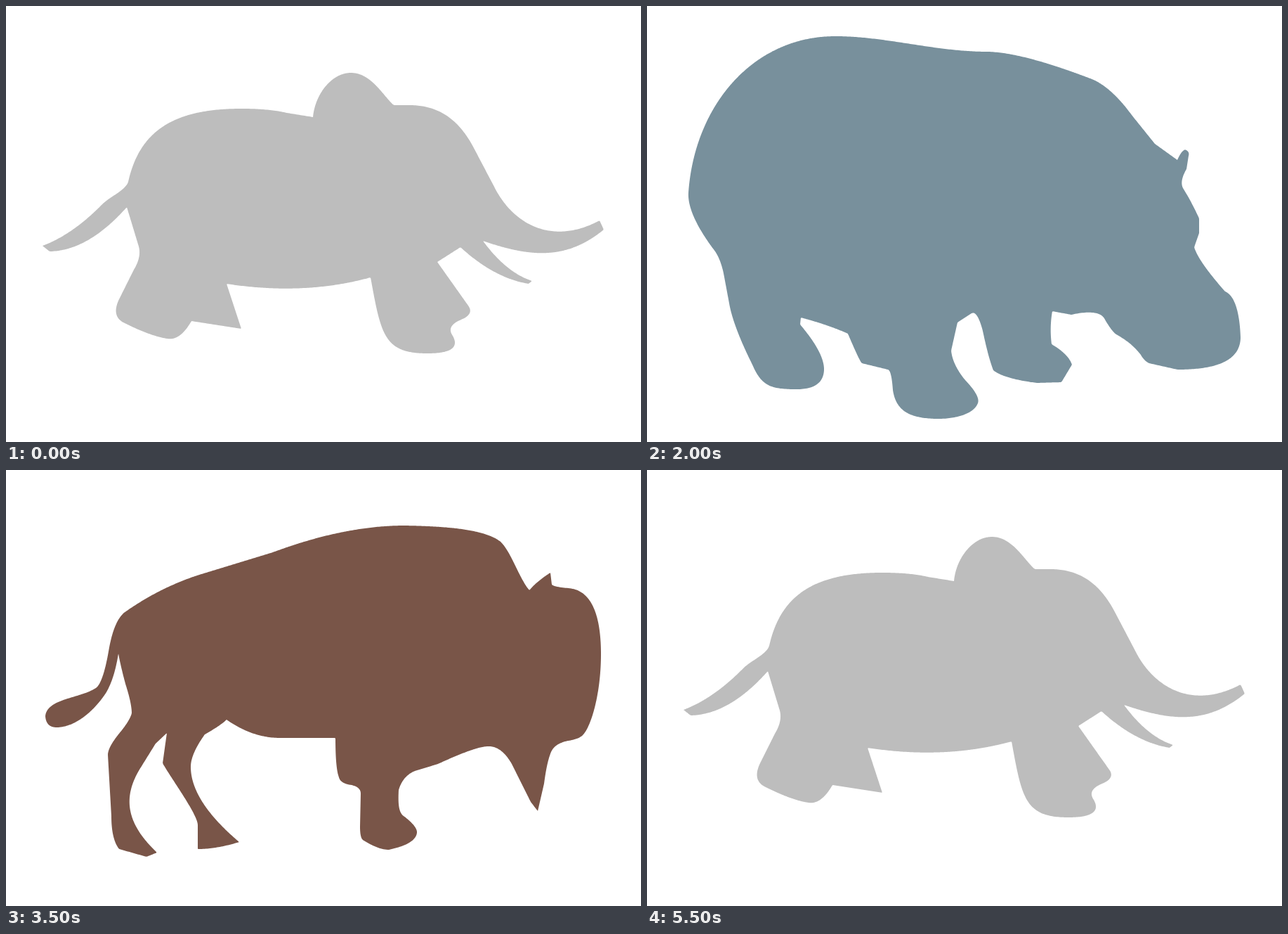
Recreate the animation shown at these times as an HTML page with a canvas. Size 904 by 620 pixels, loop 6 s.

```html
<!DOCTYPE html>
<html lang="en">
<head>
<meta charset="utf-8">
<title>Animal morph</title>
<style>
  html, body { margin: 0; width: 100%; height: 100%; overflow: hidden; background: #fff; }
  canvas { display: block; }
</style>
</head>
<body>
<canvas width="904" height="620"></canvas>
<script>
const mix = (a, b, t) => a.map((v, i) => v + (b[i] - v) * t);

// Samples a path about every 2 px, start point included at both ends.
function outline(d) {
  const path = document.createElementNS('http://www.w3.org/2000/svg', 'path');
  path.setAttribute('d', d);
  const length = path.getTotalLength(), n = Math.round(length / 2);
  return Array.from({ length: n + 1 }, (_, i) => {
    const { x, y } = path.getPointAtLength(length * i / n);
    return [x, y];
  });
}

// All outlines run clockwise from the tail tip.
const elephant = {
  color: [189, 189, 189],
  points: outline(`M52 341 Q95 325 138 281 C150 270 170 262 174 250 C190 178 238 146 335 146
    Q375 146 400 152 L437 158 C440 125 464 95 491 95 C520 95 537 128 552 141 L577 141
    C620 142 646 165 665 200 L695 257 C722 311 778 341 845 305 L851 318 C797 362 746 357 679 334
    Q712 379 749 391 L744 395 Q695 387 647 343 L614 364 L658 426 Q667 438 648 446
    Q626 455 636 469 Q650 494 600 494 C538 494 534 468 519 386 Q424 412 314 395 L335 459 L264 448
    Q248 476 230 473 Q207 470 167 450 Q149 440 162 415 L182 375 Q193 357 189 342 L172 286
    Q117 348 62 349 Z`)
};
const hippo = {
  color: [120, 144, 156],
  points: outline(`M59 265 C68 140 152 43 268 43 C340 43 410 65 485 65 Q535 66 636 105
    Q663 118 690 155 L723 196 L755 219 Q760 207 766 204 Q773 207 771 213 L768 232 Q758 249 763 259
    Q775 278 786 302 V323 L779 343 Q785 363 823 406 C838 412 844 440 845 472
    C844 505 810 517 755 517 L715 508 Q708 505 703 496 Q690 479 668 467 Q662 463 652 446
    Q645 430 604 439 L577 434 Q573 457 576 481 Q600 495 605 510 L590 535 L555 536 Q508 530 493 518
    Q486 500 478 462 Q470 432 462 437 L442 450 L433 490 Q435 510 453 532 Q475 555 471 565
    C465 580 440 587 415 587 C370 587 354 573 350 546 Q348 518 343 517 L306 508 Q303 506 286 466
    Q260 454 219 443 L218 453 Q253 494 252 518 C251 538 235 545 213 545 C175 545 163 540 150 510
    Q125 460 118 428 L109 380 Q104 357 94 345 Q57 295 59 265 Z`)
};
const bison = {
  color: [121, 85, 72],
  points: outline(`M56 350 C58 325 105 325 128 310 Q138 303 146 258 Q153 216 168 203
    Q223 164 285 146 L380 117 Q482 79 568 79 C620 80 680 83 704 102 C719 116 730 153 745 171
    Q756 158 775 146 L777 163 Q779 166 800 168 C833 170 847 205 847 262 C847 320 832 368 820 378
    Q814 383 800 385 Q781 389 776 401 Q770 415 766 446 L757 485 L747 472 L720 418 Q705 392 686 393
    Q669 393 615 418 L582 428 Q565 435 559 455 C558 475 559 487 566 492 Q586 507 585 516
    Q583 532 545 540 Q530 540 508 526 Q504 523 504 507 L505 460 Q505 451 492 448 Q476 446 474 437
    Q469 425 469 381 H390 Q351 381 314 355 Q306 363 283 376 Q263 404 263 422 C263 463 300 502 332 529
    Q300 539 273 539 V505 C273 490 236 440 223 417 L229 374 L213 389 L190 426
    C168 463 168 500 215 544 L200 550 L161 539 Q150 525 150 492 L145 405 Q145 395 160 376
    Q176 357 179 346 Q179 332 170 304 Q163 278 160 261 Q154 299 141 319 C118 352 92 366 72 366
    Q57 366 56 350 Z`)
};

function nearest(points, [x, y]) {
  const far = points.map(p => Math.hypot(p[0] - x, p[1] - y));
  return far.indexOf(Math.min(...far));
}

function along(points, i) {
  const k = Math.floor(i);
  return mix(points[k], points[Math.min(k + 1, points.length - 1)], i - k);
}

// Pairs two outlines evenly by length between linked places (x y to x y).
function morph(from, to, ...links) {
  const a = from.points, b = to.points, pairs = [];
  const ends = links.map(l => [nearest(a, l.slice(0, 2)), nearest(b, l.slice(2))]);
  ends.push([a.length - 1, b.length - 1]);
  let last = [0, 0];
  for (const end of ends) {
    const n = Math.max(end[0] - last[0], end[1] - last[1], 1);
    for (let k = 0; k < n; k++) {
      const [i, j] = mix(last, end, k / n);
      pairs.push([along(a, i), along(b, j)]);
    }
    last = end;
  }
  return { from, to, pairs };
}

const morphs = [
  morph(elephant, hippo,
    [437, 158, 202, 67], [552, 141, 700, 168], [851, 318, 786, 323], [679, 334, 604, 439],
    [614, 364, 530, 531], [632, 459, 466, 436], [519, 386, 286, 466], [314, 395, 219, 443],
    [264, 448, 118, 428], [172, 286, 59, 268]),
  morph(hippo, bison,
    [268, 43, 560, 79], [570, 82, 745, 171], [723, 196, 820, 378], [786, 302, 757, 485],
    [577, 434, 585, 512], [493, 518, 469, 381], [371, 578, 332, 529], [219, 443, 176, 482],
    [97, 349, 179, 347], [94, 345, 72, 366]),
  morph(bison, elephant,
    [481, 87, 437, 158], [728, 143, 552, 141], [745, 171, 667, 204], [835, 347, 851, 318],
    [828, 368, 679, 334], [778, 396, 647, 343], [757, 485, 635, 393], [615, 418, 600, 494],
    [559, 455, 519, 386], [469, 381, 398, 400], [314, 355, 335, 459], [263, 422, 264, 448],
    [223, 417, 157, 437], [161, 539, 174, 296], [179, 347, 172, 286])
];

// Cubic Bezier easing (.77, 0, .62, 1).
function ease(x) {
  if (x <= 0 || x >= 1) return x > 0 ? 1 : 0;
  let lo = 0, hi = 1, u;
  for (let k = 0; k < 24; k++) {
    u = (lo + hi) / 2;
    const v = 1 - u;
    if (2.31 * u * v * v + 1.86 * u * u * v + u * u * u < x) lo = u;
    else hi = u;
  }
  return u * u * (3 - 2 * u);
}

const ctx = document.querySelector('canvas').getContext('2d');

function draw(now) {
  const time = Math.floor(now / 100) * 100 % 6000;
  const { from, to, pairs } = morphs[Math.floor(time / 2000)];
  const e = ease(time % 2000 / 1500);
  ctx.clearRect(0, 0, 904, 620);
  ctx.fillStyle = `rgb(${mix(from.color, to.color, e).map(Math.round)})`;
  ctx.beginPath();
  for (const [a, b] of pairs) ctx.lineTo(...mix(a, b, e));
  ctx.fill();
}

const start = performance.now();
function tick() {
  draw(performance.now() - start);
  requestAnimationFrame(tick);
}
tick();
</script>
</body>
</html>
```
